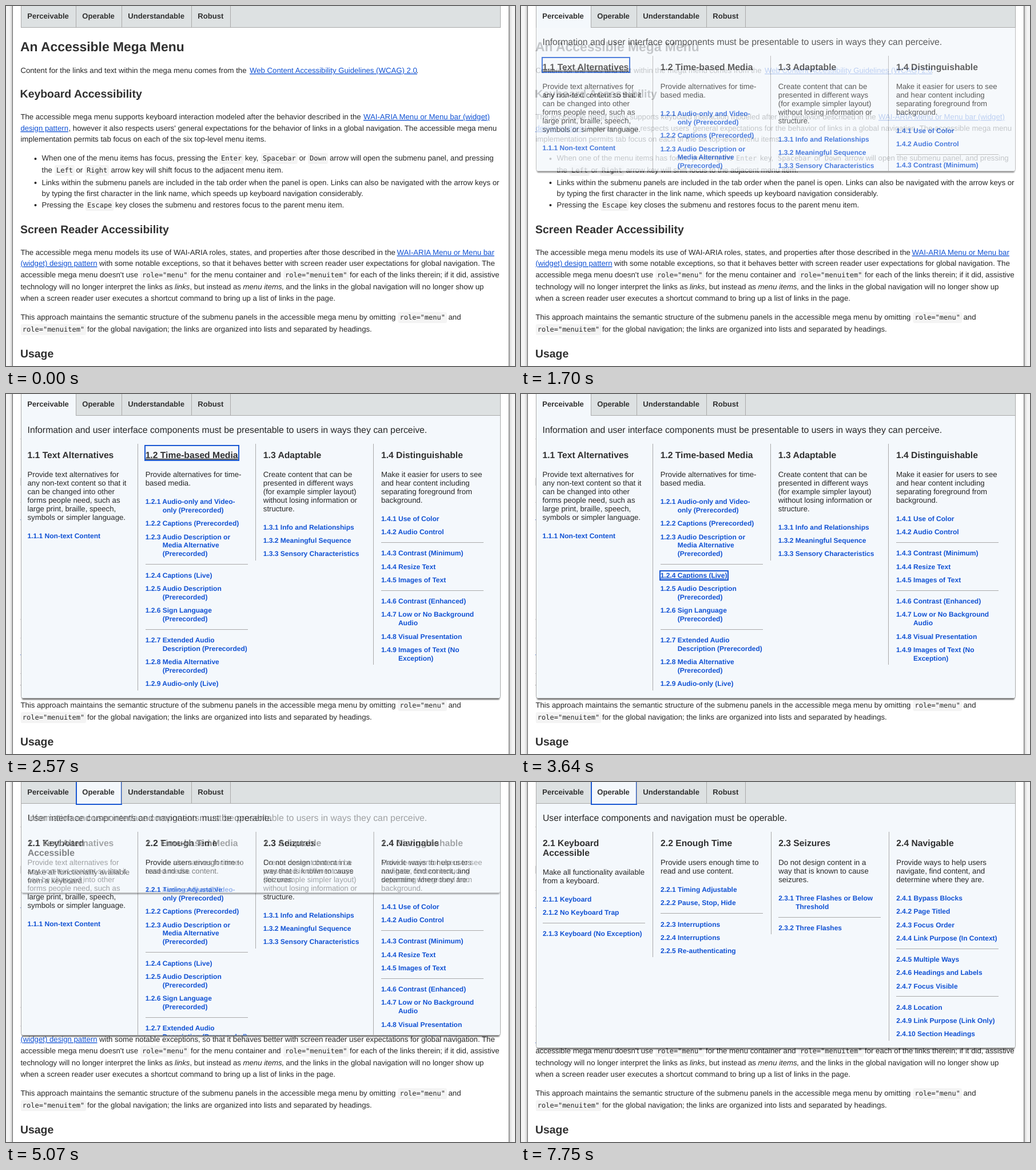
An HTML page that plays this animation: 890 px wide and 629 px high, repeating every 8000 ms.

```html
<!DOCTYPE html>
<html lang="en">
<head>
<meta charset="utf-8">
<title>Accessible Mega Menu</title>
<style>
  html, body { margin: 0; width: 100%; height: 100%; overflow: hidden; background: #f5f5f5; }
  svg { display: block; width: 890px; height: 629px; }
  text { font: 13.2px "Liberation Sans", sans-serif; fill: #272727; white-space: pre; text-rendering: geometricPrecision; }
  .h1, .h2, .tab, .head, .link { font-weight: bold; }
  .h1 { font-size: 22.9px; }
  .h2 { font-size: 19.45px; }
  .tab { font-size: 13.05px; }
  .intro { font-size: 15.82px; }
  .head { font-size: 15.7px; }
  .link { font-size: 12.02px; }
  .h1, .h2, .tab, .head { fill: #303030; }
  .link, .anchor { fill: #1152d4; }
  .anchor { text-decoration: underline; }
  .italic { font-style: italic; }
  .code { font: 12px "DejaVu Sans Mono", monospace; }
  .chip { fill: #f4f4f4; }
  .rule { stroke: #aaa; fill: none; }
  .panel-bg { fill: #f4f8fc; stroke: #aaa; }
  .panel-shadow { fill: #000; opacity: .6; filter: blur(1px); }
  .tab-bg { fill: none; stroke: #aaa; }
  .open .tab-bg { fill: #f4f8fc; clip-path: inset(0 0 12.5px 0); }
  .ring { display: none; fill: none; stroke: #1a58d2; stroke-width: 2; }
  .on .ring { display: block; }
  .on .head, .on .link { text-decoration: underline; }
  .page { fill: #fff; stroke: #666; filter: drop-shadow(0 0 2.5px rgba(0, 0, 0, .45)); }
</style>
</head>
<body>
<svg id="stage" viewBox="0 0 890 629"></svg>
<script>
const LOOP = 8000, BAR = 38, LINE = 14.9;
const stage = document.getElementById('stage');

function add(parent, tag, attrs = {}, content = '') {
  const el = document.createElementNS('http://www.w3.org/2000/svg', tag);
  for (const key in attrs) el.setAttribute(key, attrs[key]);
  el.textContent = content;
  return parent.appendChild(el);
}
const box = (parent, cls, x, y, width, height, rx = 0) =>
  add(parent, 'rect', { class: cls, x, y, width, height, rx });
const write = (parent, cls, x, y, str) => add(parent, 'text', { class: cls, x, y }, str);
const rule = (parent, d) => add(parent, 'path', { class: 'rule', d });

// Page: each row is its middle y, then pairs of x and text.
// A leading ` marks code, _ a link and * italics.
const L = 25.4, B = 62.6;
const rows = [
  [113, L, 'Content for the links and text within the mega menu comes from the', 426, '_Web Content Accessibility Guidelines (WCAG) 2.0', 717.5, '.'],
  [194, L, 'The accessible mega menu supports keyboard interaction modeled after the behavior described in the', 625, '_WAI-ARIA Menu or Menu bar (widget)'],
  [214, L, '_design pattern', 109.5, ", however it also respects users' general expectations for the behavior of links in a global navigation. The accessible mega menu"],
  [233, L, 'implementation permits tab focus on each of the six top-level menu items.'],
  [266, B, 'When one of the menu items has focus, pressing the', 376, '`Enter', 418, 'key,', 449, '`Spacebar', 512.5, 'or', 531, '`Down', 566, 'arrow will open the submenu panel, and pressing'],
  [287, B, 'the', 88, '`Left', 122.5, 'or', 141, '`Right', 183.5, 'arrow key will shift focus to the adjacent menu item.'],
  [309, B, 'Links within the submenu panels are included in the tab order when the panel is open. Links can also be navigated with the arrow keys or'],
  [328, B, 'by typing the first character in the link name, which speeds up keyboard navigation considerably.'],
  [348, B, 'Pressing the', 142, '`Escape', 191, 'key closes the submenu and restores focus to the parent menu item.'],
  [431, L, 'The accessible mega menu models its use of WAI-ARIA roles, states, and properties after those described in the', 683.5, '_WAI-ARIA Menu or Menu bar'],
  [450, L, '_(widget) design pattern', 163, 'with some notable exceptions, so that it behaves better with screen reader user expectations for global navigation. The'],
  [470, L, "accessible mega menu doesn't use", 238, '`role="menu"', 323, 'for the menu container and', 488, '`role="menuitem"', 601, 'for each of the links therein; if it did, assistive'],
  [491, L, 'technology will no longer interpret the links as', 295, '*links', 321.5, ', but instead as', 414.5, '*menu items', 482, ', and the links in the global navigation will no longer show up'],
  [511, L, 'when a screen reader user executes a shortcut command to bring up a list of links in the page.'],
  [544, L, 'This approach maintains the semantic structure of the submenu panels in the accessible mega menu by omitting', 688.5, '`role="menu"', 773.5, 'and'],
  [565, 28.8, '`role="menuitem"', 142, 'for the global navigation; the links are organized into lists and separated by headings.'],
];
const marks = { '`': 'code', _: 'anchor', '*': 'italic' };

function drawPage() {
  box(stage, 'page', 11.5, -20, 868, 680);
  write(stage, 'h1', L - .4, 79, 'An Accessible Mega Menu');
  write(stage, 'h2', L - .8, 160, 'Keyboard Accessibility');
  write(stage, 'h2', L - .3, 397, 'Screen Reader Accessibility');
  write(stage, 'h2', L - .5, 614, 'Usage');
  for (const cy of [267, 309, 348]) add(stage, 'circle', { cx: 51.5, cy, r: 2, fill: '#272727' });
  for (const [mid, ...parts] of rows) {
    for (let i = 0; i < parts.length; i += 2) {
      const x = parts[i], cls = marks[parts[i + 1][0]] || 'plain';
      const str = cls === 'plain' ? parts[i + 1] : parts[i + 1].slice(1);
      if (cls === 'code') box(stage, 'chip', x - 3, mid - 9, str.length * 7.22 + 6, 19, 3);
      write(stage, cls, x, mid + 4, str);
    }
  }
}

// Panels: per column the heading, the description and the links; | breaks a line, - draws a rule.
const panels = [
  { height: 494, left: 37.5, intro: 'Information and user interface components must be presentable to users in ways they can perceive.', columns: [
    ['1.1 Text Alternatives', 'Provide text alternatives for|any non-text content so that it|can be changed into other|forms people need, such as|large print, braille, speech,|symbols or simpler language.',
      '1.1.1 Non-text Content'],
    ['1.2 Time-based Media', 'Provide alternatives for time-|based media.',
      '1.2.1 Audio-only and Video-|only (Prerecorded)', '1.2.2 Captions (Prerecorded)', '1.2.3 Audio Description or|Media Alternative|(Prerecorded)', '-',
      '1.2.4 Captions (Live)', '1.2.5 Audio Description|(Prerecorded)', '1.2.6 Sign Language|(Prerecorded)', '-',
      '1.2.7 Extended Audio|Description (Prerecorded)', '1.2.8 Media Alternative|(Prerecorded)', '1.2.9 Audio-only (Live)'],
    ['1.3 Adaptable', 'Create content that can be|presented in different ways|(for example simpler layout)|without losing information or|structure.',
      '1.3.1 Info and Relationships', '1.3.2 Meaningful Sequence', '1.3.3 Sensory Characteristics'],
    ['1.4 Distinguishable', 'Make it easier for users to see|and hear content including|separating foreground from|background.',
      '1.4.1 Use of Color', '1.4.2 Audio Control', '-', '1.4.3 Contrast (Minimum)', '1.4.4 Resize Text', '1.4.5 Images of Text', '-',
      '1.4.6 Contrast (Enhanced)', '1.4.7 Low or No Background|Audio', '1.4.8 Visual Presentation', '1.4.9 Images of Text (No|Exception)'],
  ] },
  { height: 427, left: 37.9, intro: 'User interface components and navigation must be operable.', columns: [
    ['2.1 Keyboard|Accessible', 'Make all functionality available|from a keyboard.',
      '2.1.1 Keyboard', '2.1.2 No Keyboard Trap', '-', '2.1.3 Keyboard (No Exception)'],
    ['2.2 Enough Time', 'Provide users enough time to|read and use content.',
      '2.2.1 Timing Adjustable', '2.2.2 Pause, Stop, Hide', '-', '2.2.3 Interruptions', '2.2.4 Interruptions', '2.2.5 Re-authenticating'],
    ['2.3 Seizures', 'Do not design content in a|way that is known to cause|seizures.',
      '2.3.1 Three Flashes or Below|Threshold', '-', '2.3.2 Three Flashes'],
    ['2.4 Navigable', 'Provide ways to help users|navigate, find content, and|determine where they are.',
      '2.4.1 Bypass Blocks', '2.4.2 Page Titled', '2.4.3 Focus Order', '2.4.4 Link Purpose (In Context)', '-',
      '2.4.5 Multiple Ways', '2.4.6 Headings and Labels', '2.4.7 Focus Visible', '-',
      '2.4.8 Location', '2.4.9 Link Purpose (Link Only)', '2.4.10 Section Headings'],
  ] },
];
const targets = {};

// A heading or link that can take focus; a wrapped one is as wide as its column.
function focusable(parent, cls, x, lines, mid, step, indent, top, bottom) {
  const item = add(parent, 'g');
  const texts = lines.map((str, i) =>
    write(item, cls, x + (i ? indent : 0), Math.round(mid + i * step + (cls === 'head' ? 5.5 : 4)), str));
  const width = lines.length > 1 ? 179 : Math.round(texts[0].getComputedTextLength());
  const y = Math.round(mid - top), end = Math.round(mid + (lines.length - 1) * step + bottom);
  box(item, 'ring', Math.round(x) - 1, y + 1, width + 2, end - y - 2);
  targets[lines[0].split(' ')[0]] = item;
}

function drawColumn(parent, x, first, [head, desc, ...links]) {
  const heads = head.split('|');
  focusable(parent, 'head', x, heads, 106.4, 16.6, 0, 17.4, 10.4);
  let mid = 141.2 + (heads.length - 1) * 16.8;
  for (const str of desc.split('|')) {
    write(parent, 'plain', x, Math.round(mid + 4), str);
    mid += LINE;
  }
  mid += 17;
  let last = mid;
  for (const link of links) {
    if (link === '-') {
      rule(parent, `M${Math.round(x)} ${Math.floor(last + 18.3) + .5}h179`);
      mid += 13.9;
      continue;
    }
    const lines = link.split('|');
    focusable(parent, 'link', x, lines, mid, LINE, 30, 9, 9);
    last = mid + (lines.length - 1) * LINE;
    mid = last + 23.3;
  }
  if (!first) rule(parent, `M${Math.floor(x - 13.2) + .5} 87V${Math.round(last + 11.3)}`);
}

function drawPanel(panel, index) {
  const group = panel.group = add(stage, 'g');
  panel.shadow = box(group, 'panel-shadow', 28, 20, 835, 20, 2);
  panel.bg = box(group, 'panel-bg', 26.5, 20.5, 838, 20, 3);
  const clip = add(group, 'clipPath', { id: 'clip' + index });
  panel.clip = box(clip, '', 0, BAR, 890, 0);
  const body = add(group, 'g', { 'clip-path': `url(#clip${index})` });
  write(body, 'intro', panel.left, 68, panel.intro);
  panel.columns.forEach((column, i) => drawColumn(body, panel.left + i * 206.15, !i, column));
}

function showPanel({ group, shadow, bg, clip, height }, limit, opacity) {
  const h = Math.round(Math.min(height, limit));
  group.style.display = h > 0 && opacity > 0 ? '' : 'none';
  group.style.opacity = opacity;
  clip.setAttribute('height', h);
  bg.setAttribute('height', h + 17);
  shadow.setAttribute('height', h + 20);
}

const tabs = [['Perceivable', 26, 122], ['Operable', 122, 202], ['Understandable', 202, 324], ['Robust', 324, 392]];

function drawBar() {
  add(stage, 'rect', { class: 'rule', x: 26.5, y: -10, width: 838, height: 47.5, style: 'fill:#dde1e2' });
  tabs.forEach(([label, x, end], i) => {
    const tab = targets['tab' + i] = add(stage, 'g');
    tab.bg = box(tab, 'tab-bg', x + .5, -10, end - x, 47.5);
    write(tab, 'tab', x + 11.3, 22, label);
    tab.ring = box(tab, 'ring', x + 1, -10, end - x - 1, 47);
  });
}

function setTab(index, open) {
  const tab = targets['tab' + index], [, x, end] = tabs[index];
  const left = open && index === 0 ? x : x + 1;
  tab.classList.toggle('open', open);
  tab.bg.setAttribute('height', open ? 60 : 47.5);
  tab.ring.setAttribute('x', left);
  tab.ring.setAttribute('width', end - left);
  tab.ring.setAttribute('height', open ? 49 : 47);
}

const focusOrder = [
  [0, ''], [1200, 'tab0'], [1620, '1.1'], [2000, '1.1.1'], [2570, '1.2'], [3100, '1.2.1'], [3190, '1.2.2'],
  [3460, '1.2.3'], [3640, '1.2.4'], [3910, '1.3'], [4270, '1.4'], [4630, 'tab0'], [4980, 'tab1'],
  [5770, '2.1'], [6040, '2.1.1'], [6220, '2.1.2'], [6490, '2.2'], [6670, '2.3'], [6940, '2.4'], [7750, 'tab1'],
];
const ticks = [0, 1620, 1700, 1790, 1880, 2000, 4980, 5070, 5160, 5270];

// The CSS "ease" curve, solved by bisection.
function ease(x) {
  if (x <= 0) return 0;
  if (x >= 1) return 1;
  const curve = (u, a, b) => 3 * u * (1 - u) ** 2 * a + 3 * u * u * (1 - u) * b + u ** 3;
  let low = 0, high = 1;
  for (let i = 0; i < 20; i++) {
    const u = (low + high) / 2;
    if (curve(u, .25, .25) < x) low = u; else high = u;
  }
  return curve(low, .1, 1);
}

function render(time) {
  const tick = ticks.findLast(at => at <= time);
  const grow = start => 700 * ease((tick - start) / 500);
  const fade = start => ease((tick - start) / 250);
  const closing = 521 * (1 - ease((tick - 4986) / 500));
  showPanel(panels[0], tick < 4980 ? grow(1586) : closing, tick < 5270 ? fade(1586) : 0);
  showPanel(panels[1], grow(4986), fade(4986));
  setTab(0, time >= 1620 && time < 4980);
  setTab(1, time >= 4980);

  const focus = focusOrder.findLast(([at]) => at <= time)[1];
  for (const key in targets) targets[key].classList.toggle('on', key === focus);
}

drawPage();
panels.forEach(drawPanel);
drawBar();

const start = performance.now();
function frame() {
  render((performance.now() - start) % LOOP);
  requestAnimationFrame(frame);
}
frame();
</script>
</body>
</html>
```
